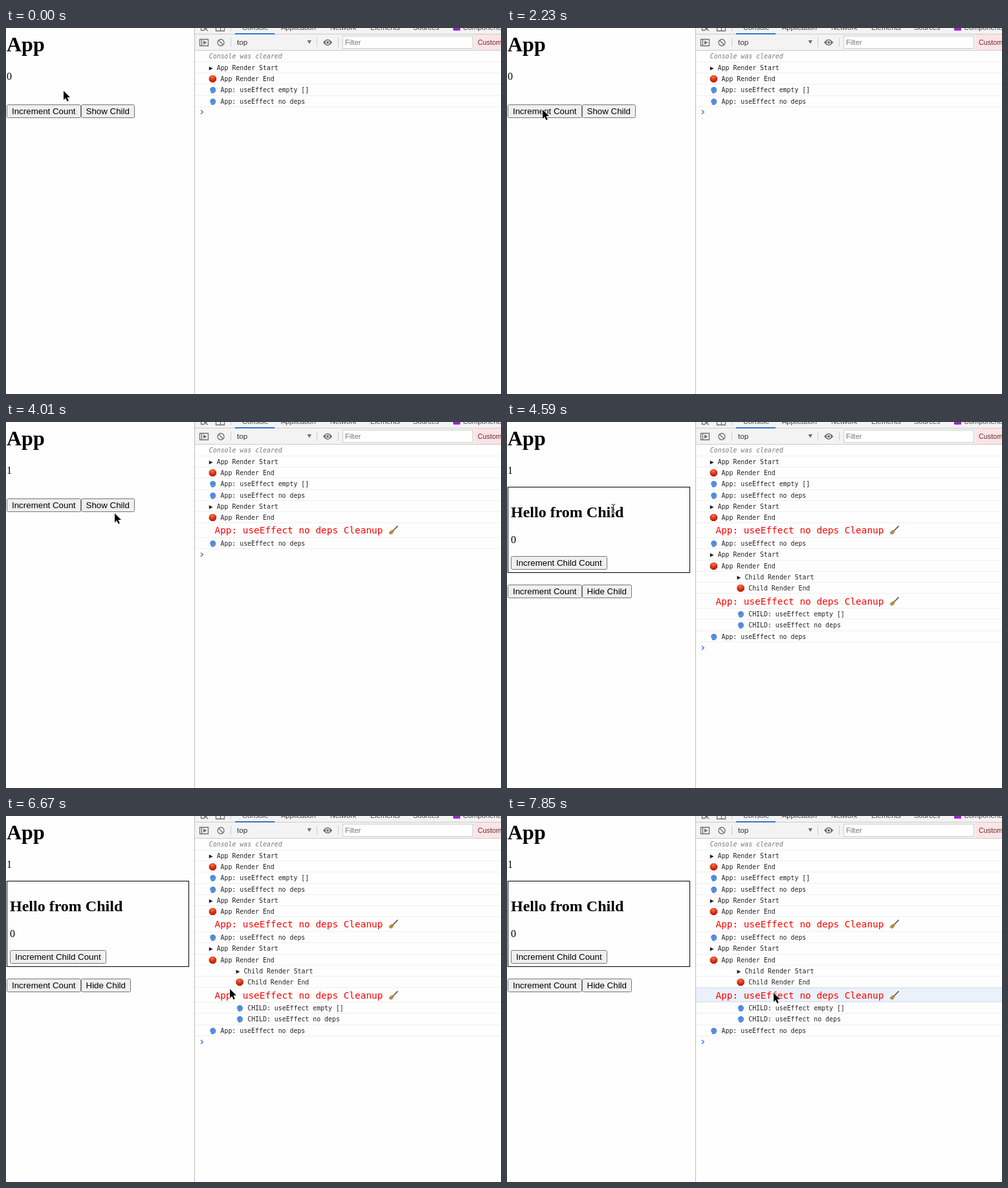
An HTML page that plays this animation: 765x565 px, repeating every 8 s.

```html
<!DOCTYPE html>
<html lang="en">
<head>
<meta charset="utf-8">
<title>Effect order demo</title>
<style>
  html, body { margin: 0; width: 100%; height: 100%; overflow: hidden; background: #fefefe; }
  svg { display: block; width: 765px; height: 565px; }
  .serif { font-family: "Liberation Serif", serif; font-size: 16px; }
  .bold { font-weight: bold; }
  .label { font: 13.333px "Liberation Sans", sans-serif; }
  .tool { font: 11px "Liberation Sans", sans-serif; fill: #4a4a4a; }
  .log { font: 9.9px "DejaVu Sans Mono", monospace; fill: #222; }
  .log.note { font-style: italic; fill: #777; }
  .log.cleanup { font-size: 14.4px; fill: #f00; }
  .button { fill: #efefef; stroke: #767676; }
  .button.active { fill: #f5f5f5; stroke: #8d8d8d; }
  .button.hover { fill: #e5e5e5; stroke: #5a5a5a; }
  .line { fill: none; stroke: #6e6e6e; stroke-width: 1.3; }
  .divider { stroke: #ccc; }
</style>
</head>
<body>
<svg viewBox="0 0 765 565" xmlns="http://www.w3.org/2000/svg">
  <defs>
    <radialGradient id="red" cx=".45" cy=".25" r=".8">
      <stop offset="0" stop-color="#f4794f"/><stop offset=".5" stop-color="#dd3416"/><stop offset="1" stop-color="#a81605"/>
    </radialGradient>
    <path id="stop" d="M-2.4 -5.5h4.8l3.3 3.2v4.6l-3.3 3.2h-4.8l-3.3-3.2v-4.6z" fill="url(#red)"/>
    <g id="swirl"><circle r="4.8" fill="#c3dcf7"/><path id="spiral" fill="none" stroke="#2c6cd2" stroke-width="1.35"/></g>
    <g id="broom">
      <path d="M14 .8L7 8" stroke="#70552f" stroke-width="1.7" stroke-linecap="round"/>
      <path d="M5.2 6.7L8.3 9.6 6.2 13 3.2 13.8 .4 11.6 2 8.8z" fill="#c9a45a"/>
      <path d="M5 6.8L8.3 9.8M1.7 11.2L5 8.8M3.6 13L6.4 10" stroke="#816231"/>
    </g>
  </defs>

  <text class="serif bold" x="1" y="36" style="font-size:32px">App</text>
  <text class="serif" id="count" x="1" y="80"></text>
  <g id="child">
    <rect x="1.5" y="100.5" width="281" height="132" fill="none" stroke="#000"/>
    <text class="serif bold" x="6" y="147" style="font-size:24px">Hello from Child</text>
    <text class="serif" x="6" y="187">0</text>
    <rect class="button" x="6.5" y="207.5" width="148" height="20" rx="2"/>
    <text class="label" x="14" y="222">Increment Child Count</text>
  </g>
  <g id="buttons">
    <rect class="button" id="increment" x="1.5" y="118.5" width="114" height="20" rx="2"/>
    <text class="label" x="9" y="133">Increment Count</text>
    <rect class="button" id="toggle" x="116.5" y="118.5" height="20" rx="2"/>
    <text class="label" id="toggleLabel" x="123.5" y="133"></text>
  </g>

  <rect x="292" width="473" height="35" fill="#f3f3f3"/>
  <path class="divider" d="M292 9.5H765M292 34.5H765M347.5 0V5M347.5 15V29M480.5 15V29M513.5 15V29"/>
  <path d="M291.5 0V565" stroke="#bdbdbd"/>
  <path d="M354 9H415" stroke="#2f78d0" stroke-width="2"/>
  <g class="tool" id="tabs"></g>
  <rect x="691" y="-7" width="11" height="11" rx="1" fill="#9b27c9"/>
  <path class="line" d="M301.5 0V3.5H306M307 0L312 4.5M307 4V0H311M324.5 0V4.5H331M331.5 0V4.5H337.5V0"/>
  <path class="line" d="M299.5 17.5H312.5V27.5H299.5ZM302.5 17V28"/>
  <path d="M305 19.5L310.5 22.5 305 25.5zM465.5 19H472L468.8 24.5z" fill="#6e6e6e"/>
  <circle class="line" cx="332" cy="22.5" r="5"/>
  <path class="line" d="M328.5 19L335.5 26"/>
  <path d="M490 22.2Q497 12.8 504.2 22.2Q497 31.6 490 22.2z" fill="#6e6e6e"/>
  <circle cx="497.1" cy="22.2" r="2.6" fill="#6e6e6e" stroke="#f3f3f3" stroke-width="1.3"/>
  <rect x="520.5" y="12.5" width="201" height="19" fill="#fff" stroke="#ccc"/>
  <rect x="724" y="10" width="41" height="24" fill="#fde3e5"/>
  <g class="tool">
    <text x="357" y="26" style="font-size:11.7px;fill:#333">top</text>
    <text x="524" y="26" style="fill:#757575">Filter</text>
    <text x="729" y="26" style="font-size:10.8px;fill:#5b3036">Custom</text>
  </g>

  <g id="highlight">
    <rect x="292" y="265" width="473" height="22" fill="#ebf1fb"/>
    <path d="M292 265.5H765M292 286.5H765" stroke="#d5e1f5"/>
  </g>
  <g id="console"></g>
  <path id="prompt" d="M301 -3L304.3 0 301 3" fill="none" stroke="#3f7ff0" stroke-width="1.5"/>

  <path id="arrow" d="M0 0V14L3.2 11 5.5 16.2 7.8 15.2 5.5 10.1H10z" stroke="#fff" stroke-width="1.6" paint-order="stroke"/>
  <g id="beam" fill="none">
    <path d="M161.5 127Q164.5 127 164.5 129V139Q164.5 141 161.5 141M167.5 127Q164.5 127 164.5 129M164.5 139Q164.5 141 167.5 141M162.5 135.5H166.5" stroke="#fff" stroke-width="2.4"/>
    <path d="M161.5 127Q164.5 127 164.5 129V139Q164.5 141 161.5 141M167.5 127Q164.5 127 164.5 129M164.5 139Q164.5 141 167.5 141M162.5 135.5H166.5" stroke="#111"/>
  </g>
</svg>
<script>
const $ = id => document.getElementById(id);
const LOOP = 8000, COUNTED = 2380, CHILD_SHOWN = 4450, LEFT = 313.8, INDENT = 41.7;

// Each row: time it appears, kind, text, nesting depth.
const rows = [
  [0, 'note', 'Console was cleared'],
  [0, 'start', 'App Render Start'],
  [0, 'stop', 'App Render End'],
  [0, 'swirl', 'App: useEffect empty []'],
  [0, 'swirl', 'App: useEffect no deps'],
  [COUNTED, 'start', 'App Render Start'],
  [COUNTED, 'stop', 'App Render End'],
  [COUNTED, 'cleanup', 'App: useEffect no deps Cleanup'],
  [COUNTED, 'swirl', 'App: useEffect no deps'],
  [CHILD_SHOWN, 'start', 'App Render Start'],
  [CHILD_SHOWN, 'stop', 'App Render End'],
  [CHILD_SHOWN, 'start', 'Child Render Start', 1],
  [CHILD_SHOWN, 'stop', 'Child Render End', 1],
  [CHILD_SHOWN, 'cleanup', 'App: useEffect no deps Cleanup'],
  [CHILD_SHOWN, 'swirl', 'CHILD: useEffect empty []', 1],
  [CHILD_SHOWN, 'swirl', 'CHILD: useEffect no deps', 1],
  [CHILD_SHOWN, 'swirl', 'App: useEffect no deps']
];

// Pointer tip: time, x, y. The pointer jumps from one place to the next.
const pointer = [
  [0, 89, 97], [150, 68, 152], [290, 38, 138], [440, 54, 119],
  [740, 54, 122], [890, 55, 126], [1790, 54, 128], [2230, 55, 126],
  [2830, 90, 120], [2980, 190, 109], [3130, 320, 112], [3270, 410, 123],
  [3420, 462, 138], [3570, 425, 162], [3710, 280, 168], [3860, 185, 152],
  [4010, 168, 141], [4150, 164, 130],
  [5940, 168, 142], [6090, 190, 164], [6240, 230, 196], [6380, 280, 228],
  [6530, 322, 254], [6670, 346, 267], [6820, 353, 271], [6970, 357, 273],
  [7110, 364, 274], [7260, 375, 276], [7410, 388, 276], [7550, 399, 275],
  [7700, 407, 274], [7850, 412, 273]
];

const show = (node, on) => node.style.display = on ? '' : 'none';
const text = (x, y, cls, content) => `<text class="${cls}" x="${x}" y="${y}">${content}</text>`;

function rowMarkup(kind, content, depth, top, height) {
  const x = LEFT + depth * INDENT, mid = top + height / 2, base = Math.round(mid + 3.4);
  if (kind === 'note') return text(x, base, 'log note', content);
  if (kind === 'start') return text(x, base, 'log', '▶ ' + content);
  if (kind === 'cleanup') {
    const y = Math.round(mid + 4.75);
    return text(x + 8.67, y, 'log cleanup', content) + `<use href="#broom" x="591" y="${y - 12}"/>`;
  }
  return `<use href="#${kind}" x="${x + 5.6}" y="${base - 3.5}"/>` + text(x + 17.7, base, 'log', content);
}

function buildConsole() {
  let top = 35.4, markup = '';
  const promptY = {};
  for (const [time, kind, content, depth = 0] of rows) {
    const height = kind === 'cleanup' ? 22.7 : 17.28;
    const edge = Math.floor(top + height - .5) + .5;
    markup += `<g data-time="${time}"><path d="M292 ${edge}H765" stroke="#efefef"/>`
      + rowMarkup(kind, content, depth, top, height) + '</g>';
    top += height;
    promptY[time] = Math.round(top + 8.64) - .2;
  }
  $('console').innerHTML = markup;
  return promptY;
}

let spiral = 'M0 0';
for (let a = .3; a < 15; a += .3) {
  const r = a * .32;
  spiral += `L${(r * Math.cos(a)).toFixed(2)} ${(r * Math.sin(a)).toFixed(2)}`;
}
$('spiral').setAttribute('d', spiral);
$('tabs').innerHTML = [[365, 'Console'], [425, 'Application'], [501, 'Network'],
  [563, 'Elements'], [629, 'Sources'], [706, 'Components']]
  .map(([x, name]) => text(x, 3, '', name)).join('');

const promptY = buildConsole();
const rowNodes = [...$('console').children];

function render(t) {
  const within = (from, to) => t >= from && t < to;
  const childShown = t >= CHILD_SHOWN;
  const stage = childShown ? CHILD_SHOWN : t >= COUNTED ? COUNTED : 0;

  $('count').textContent = t >= COUNTED ? 1 : 0;
  show($('child'), childShown);
  $('buttons').setAttribute('transform', `translate(0 ${childShown ? 133 : 0})`);
  $('toggleLabel').textContent = childShown ? 'Hide Child' : 'Show Child';
  $('toggle').setAttribute('width', childShown ? 76 : 82);
  $('increment').setAttribute('class', 'button'
    + (within(1790, 2230) ? ' active' : within(COUNTED, 2830) ? ' hover' : ''));
  $('toggle').setAttribute('class', 'button' + (within(4300, CHILD_SHOWN) ? ' active' : ''));

  rowNodes.forEach(row => show(row, t >= row.dataset.time));
  $('prompt').setAttribute('transform', `translate(0 ${promptY[stage]})`);
  show($('highlight'), t >= 7110);

  const overHeading = within(4590, 5940);
  const [, x, y] = pointer.findLast(([time]) => time <= t);
  $('arrow').setAttribute('transform', `translate(${x} ${y})`);
  show($('arrow'), !overHeading);
  show($('beam'), overHeading);
}

const began = performance.now();
function tick() {
  render((performance.now() - began) % LOOP);
  requestAnimationFrame(tick);
}
tick();
</script>
</body>
</html>
```
